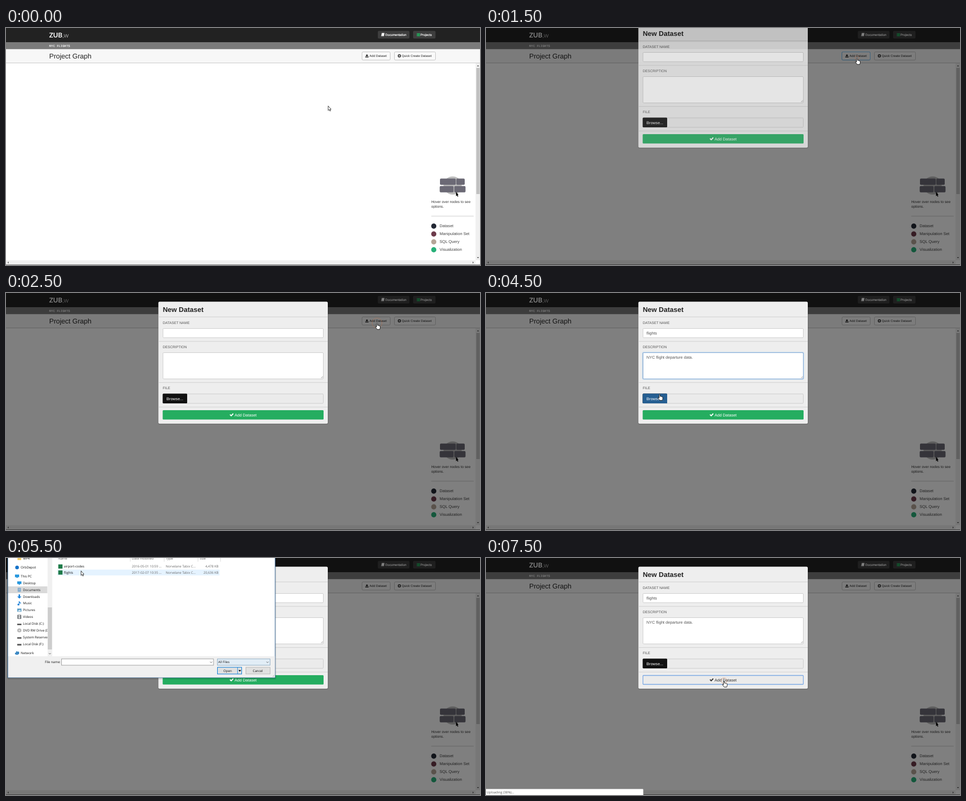
An HTML page for the animation above (8000 ms loop, 900 by 451 pixels).

```html
<!DOCTYPE html>
<html lang="en">
<head>
<meta charset="utf-8">
<title>Add a dataset</title>
<style>
  html, body { margin: 0; width: 100%; height: 100%; overflow: hidden; background: #fff; }
  svg { display: block; width: 900px; height: 451px; }
  text { font-family: "Liberation Sans", Arial, sans-serif; text-rendering: geometricPrecision; white-space: pre; }
  .mono { font: 6px "Liberation Mono", monospace; }
  .btn { font-size: 5.95px; }
  .key { font-size: 7.6px; fill: #444; }
  .label { font-size: 6.7px; fill: #555; }
  .field { font-size: 7.6px; fill: #555; }
  .head { font-size: 13px; }
  .win text, .status text { font-family: "Open Sans", "Noto Sans", sans-serif; font-size: 6.2px; fill: #111; }
  .win .dim { fill: #666; }
  .ring { fill: none; stroke: #cf7040; stroke-width: .8; }
</style>
</head>
<body>
<svg viewBox="0 0 900 451">
  <defs>
    <path id="arrow" d="M0 0V8.6L2 6.8 3.3 9.8 4.6 9.2 3.4 6.4H5.6Z" fill="#fff" stroke="#000" stroke-width=".75"/>
    <path id="hand" d="M-.9.8Q0-.6.9.8V4.2Q2.4 3.7 2.7 4.6 4.1 4.2 4.4 5.1 6 5 6 6.3V9L5 11.8H.3L-3 7.6Q-3.4 6.2-2 6.5L-.9 7.5Z" fill="#fff" stroke="#000" stroke-width=".85"/>
    <path id="check" d="M0 3.4 1.4 2 3 3.6 6.2.2 7.6 1.6 3 6.4Z"/>
    <path id="chevron" d="M-2-1 0 1 2-1" fill="none" stroke="#444" stroke-width=".8"/>
  </defs>

  <g id="page">
    <rect width="900" height="451" fill="#fff"/>
    <rect width="900" height="27" fill="#222"/>
    <rect y="27" width="900" height="13.5" fill="#7b7b7b"/>
    <rect y="40.5" width="900" height="26" fill="#f7f7f7"/>
    <path d="M0 66.5H900" stroke="#c8c8c8"/>
    <text x="82" y="18.2" fill="#fff" style="font:12.5px Lato,sans-serif"><tspan font-weight="700">ZUB</tspan><tspan font-weight="300">,w</tspan></text>
    <text class="mono" x="82" y="36" fill="#fff" stroke="#fff" stroke-width=".15">NYC FLIGHTS</text>
    <text class="head" x="82" y="58" fill="#222">Project Graph</text>

    <g fill="#3e3e3e">
      <rect x="706" y="5.5" width="60" height="14.5" rx="2"/>
      <rect x="773" y="5.5" width="42.5" height="14.5" rx="2"/>
    </g>
    <path d="M713.6 9.6H718.6L717.6 15.6H712.4Z" fill="#fff"/>
    <path d="M713.2 15H717.4" stroke="#888" stroke-width=".5"/>
    <rect x="780" y="10" width="6" height="5.6" fill="#23b35f"/>
    <path d="M780 11.8H786M780 13.7H786M782 10V15.6" stroke="#3e3e3e" stroke-width=".4"/>
    <g class="btn" fill="#fff" stroke="#fff" stroke-width=".18">
      <text x="720.3" y="15">Documentation</text>
      <text x="787" y="15">Projects</text>
    </g>

    <g fill="#f9f9f9" stroke="#c4c4c4">
      <rect x="676" y="45.5" width="53.5" height="15.5" rx="2"/>
      <rect x="737.5" y="45.5" width="78" height="15.5" rx="2"/>
    </g>
    <g class="btn" fill="#222">
      <text x="690.3" y="55.2">Add Dataset</text>
      <text x="751.4" y="55.2">Quick Create Dataset</text>
      <path d="M685.3 50 688 52.8H686.3V54.4H684.3V52.8H682.6ZM682.3 54H683.6V55H687V54H688.3V56H682.3Z"/>
      <circle cx="746.9" cy="53" r="3"/>
      <path d="M745.1 53H748.7M746.9 51.2V54.8" stroke="#fff"/>
    </g>

    <circle cx="848" cy="299.7" r="17.3" fill="#bdbdbd"/>
    <g fill="#6b6975">
      <rect x="824" y="286.5" width="30" height="12" rx="2"/>
      <rect x="855" y="286.5" width="16" height="12" rx="2"/>
      <rect x="823.5" y="300.7" width="26.3" height="12" rx="2"/>
      <rect x="851.2" y="300.7" width="21.3" height="12" rx="2"/>
    </g>
    <path d="M854.5 311.5V320L856.2 318.4 857.4 321 858.7 320.4 857.5 317.8H859.2Z"/>
    <g fill="#333" font-size="6.85">
      <text x="807.4" y="333.2">Hover over nodes to see</text>
      <text x="807.4" y="342.2">options.</text>
    </g>
    <path d="M807.5 358H888" stroke="#ccc"/>
    <g id="legend"></g>

    <rect x="891.5" y="67" width="8.5" height="375" fill="#f0f0f0"/>
    <rect x="893" y="76" width="6.5" height="240" fill="#c1c1c1"/>
    <rect y="442" width="891.5" height="8" fill="#f0f0f0"/>
    <path d="M894.2 73 896.2 70.8 898.2 73ZM894.2 436 896.2 438.2 898.2 436ZM5 444.2 3 446.2 5 448.2ZM886 444.2 888 446.2 886 448.2Z" fill="#555"/>
    <rect y="450" width="900" height="1" fill="#777"/>
  </g>

  <rect data-at="1500 8000" width="900" height="451" opacity=".5"/>
  <rect data-at="1500 2500" x="675.5" y="45.5" width="54" height="15.5" rx="2" fill="none" stroke="#3d6480"/>

  <g id="modal" data-at="1500 8000">
    <rect x="288.7" y="16" width="323" height="234" rx="3" fill="#000" opacity=".22"/>
    <rect x="289.3" y="16.5" width="321.7" height="232.3" rx="2.5" fill="#eee"/>
    <path d="M289.5 45.5H611M289.5 92H611M289.5 170.3H611M289.5 217H611" stroke="#d0d0d0"/>
    <text class="head" x="297.7" y="36.3" font-weight="700" fill="#222">New Dataset</text>
    <g class="label">
      <text x="297.7" y="58.8">DATASET NAME</text>
      <text x="297.7" y="104.9">DESCRIPTION</text>
      <text x="297.7" y="183.4">FILE</text>
    </g>
    <g fill="#fff" stroke="#ccc">
      <rect x="298" y="67.5" width="304.5" height="17.5" rx="1.5"/>
      <rect x="298" y="113.5" width="304.5" height="50" rx="1.5"/>
      <rect x="298" y="192" width="304.5" height="18" rx="1.5" fill="#ebebeb"/>
    </g>
    <path d="M598 162 601.5 158.5M600 162 601.5 160.5" stroke="#777" stroke-width=".6"/>
    <g data-at="3500 5500" fill="none" stroke="#66afe9">
      <rect x="297.5" y="113" width="305.5" height="51" rx="2" stroke-width="2.5" opacity=".25"/>
      <rect x="298" y="113.5" width="304.5" height="50" rx="1.5" stroke="#86a9d6"/>
    </g>
    <g class="field">
      <text data-at="3500 8000" x="304.8" y="78.7">flights</text>
      <text data-at="3500 4500" x="304.8" y="125">NYC flight dep</text>
      <text data-at="4500 8000" x="304.8" y="125">NYC flight departure data.</text>
    </g>
    <rect x="297.5" y="191.5" width="46.5" height="18.5" rx="1.5" fill="#111"/>
    <rect data-at="4500 5500" x="297.5" y="191.5" width="46.5" height="18.5" rx="1.5" fill="#265f92"/>
    <text x="304.8" y="203.5" font-size="7.6" fill="#fff">Browse...</text>
    <g data-at="1500 7500" fill="#fff">
      <rect x="297.5" y="223" width="305.5" height="17.8" rx="1.5" fill="#25ad60"/>
      <use href="#check" x="424.6" y="228.6"/>
      <text x="434" y="234.7" font-size="7.6">Add Dataset</text>
    </g>
    <g data-at="7500 8000" fill="#333">
      <rect x="298" y="223.5" width="304.5" height="17" rx="1" fill="#ebebeb" stroke="#79a7e3" stroke-width="1.3"/>
      <use href="#check" x="424.6" y="228.6"/>
      <text x="434" y="234.7" font-size="7.6">Add Dataset</text>
    </g>
  </g>

  <g class="win" data-at="5500 7500">
    <rect x="2" y="-5" width="511" height="236" rx="3" fill="#000" opacity=".13"/>
    <rect x="3.5" y="-2" width="507.5" height="229.7" fill="#fff" stroke="#3c6d9c"/>
    <rect x="4" y="187" width="506.5" height="40.3" fill="#f0f0f0"/>
    <rect x="79" y="0" width="8.7" height="187" fill="#f0f0f0"/>
    <rect x="79.3" y="94" width="8" height="80" fill="#cdcdcd"/>
    <use href="#chevron" x="83.3" y="182"/>
    <rect x="4" y="54" width="74.5" height="13" fill="#d9d9d9"/>
    <clipPath id="side"><rect x="4" y="0" width="74.7" height="187"/></clipPath>
    <g id="tree" clip-path="url(#side)"></g>
    <path d="M236 0V7M300.3 0V7M364.6 0V7M407.3 0V7" stroke="#ddd"/>
    <rect data-at="5500 6500" x="97.5" y="22" width="308" height="11.2" fill="#e5f3ff"/>
    <rect data-at="6500 7500" x="97.5" y="22" width="308" height="11.2" fill="#d9d9d9"/>
    <g id="files"></g>

    <text x="74" y="200.3">File name:</text>
    <rect x="105.5" y="192" width="288.5" height="12" fill="#fff" stroke="#8a8a8a" stroke-width=".8"/>
    <use href="#chevron" x="389.5" y="198.3"/>
    <g data-at="6500 7500">
      <rect x="107" y="193.8" width="19.3" height="8.6" fill="#0078d7"/>
      <text x="107.2" y="200.3" style="fill:#fff">flights</text>
    </g>
    <rect x="401.3" y="192" width="100" height="12" fill="#e2edf6" stroke="#7b9db8" stroke-width=".8"/>
    <text x="403" y="200.3">All Files</text>
    <use href="#chevron" x="496.5" y="198.3"/>
    <rect x="401.5" y="208" width="46" height="12.8" fill="#e1e1e1" stroke="#0078d7"/>
    <rect data-at="6500 7500" x="402" y="208.5" width="45" height="11.8" fill="#d3e8f8"/>
    <path d="M439.7 208V220.8" stroke="#0078d7" stroke-width=".8"/>
    <path d="M441.4 213.2H446.4L443.9 216.2Z"/>
    <text x="412.8" y="216.5">Open</text>
    <rect x="455.4" y="208" width="46" height="12.8" fill="#e1e1e1" stroke="#adadad" stroke-width=".8"/>
    <text x="468.5" y="216.5">Cancel</text>
    <path d="M506 226 509.5 222.5M508 226 509.5 224.5" stroke="#aaa" stroke-width=".7"/>
  </g>

  <g class="status" data-at="7500 8000">
    <path d="M-1 439.5H297Q298.7 439.5 298.7 441V452H-1Z" fill="#fff" stroke="#b5b5b5"/>
    <text x="1.3" y="447.6" style="fill:#555">Uploading (38%)...</text>
  </g>

  <circle class="ring" id="ring"/>
  <path id="beam" d="M-1.8 0H1.8M0 0V8M-1.8 8H1.8" fill="none" stroke="#222" stroke-width=".8"/>
  <use id="arrowPtr" href="#arrow"/>
  <use id="handPtr" href="#hand"/>
</svg>

<script>
const $ = id => document.getElementById(id);
const NS = 'http://www.w3.org/2000/svg';

function add(parent, tag, attrs, text = '') {
  const el = document.createElementNS(NS, tag);
  for (const k in attrs) el.setAttribute(k, attrs[k]);
  el.textContent = text;
  parent.append(el);
}

[['Dataset', '#232834'], ['Manipulation Set', '#6d3b4b'], ['SQL Query', '#b6a598'], ['Visualization', '#28b078']]
  .forEach(([name, fill], i) => {
    const y = 377 + i * 15;
    add($('legend'), 'circle', { cx: 812.2, cy: y, r: 4.9, fill });
    add($('legend'), 'text', { class: 'key', x: 823.3, y: y + 2.4 }, name);
  });

// Icon outlines are drawn around their own centre.
const icons = {
  folder: ['M-3.5-3H-.5L.3-2H3.5V3H-3.5Z', '#f3cf6b'],
  cloud: ['M-3.5 0A3.5 3.5 0 1 1 3.5 0A3.5 3.5 0 1 1-3.5 0Z', '#1673c9'],
  screen: ['M-4-3H4V2H1V3.5H-1V2H-4Z', '#2496dd'],
  page: ['M-3-3.8H3V3.8H-3ZM-1.5-2V-1.2H1.5V-2ZM-1.5 0V.8H1.5V0Z', '#7fa9cc'],
  down: ['M-1.4-4H1.4V0H4L0 4-4 0H-1.4Z', '#1e82d8'],
  note: ['M-1-4 .2-4Q.5-2 3-1V1Q1.5-.6 .2-.7V2.2A1.9 1.6 0 1 1-1 1Z', '#1e82d8'],
  photo: ['M-4-3H4V3H-4ZM-3 2H3L1-1-.5 1-1.5 0Z', '#5b9fc8'],
  film: ['M-3.5-3.8H3.5V3.8H-3.5ZM-2-2.8V-.5H2V-2.8ZM-2 .5V2.8H2V.5Z', '#4b5257'],
  disk: ['M-4 0H4V2.8H-4Z', '#555'],
  disc: ['M-4 0A4 3.8 0 1 1 4 0A4 3.8 0 1 1-4 0ZM-1 0A1 1 0 1 0 1 0A1 1 0 1 0-1 0Z', '#b9b9b9'],
  net: ['M-2-3.5 4-2.5V1.5L0 3.5-4 2V-.5L-2-1Z', '#3e8ac4']
};
[['folder', 'MP4', 1], ['cloud', 'OrbDepot', 18, 1], ['screen', 'This PC', 34.5, 1],
 ['screen', 'Desktop', 47.5], ['page', 'Documents', 60.5], ['down', 'Downloads', 73.3],
 ['note', 'Music', 86.2], ['photo', 'Pictures', 99.2], ['film', 'Videos', 112],
 ['disk', 'Local Disk (C:)', 125], ['disc', 'DVD RW Drive (D', 137.8], ['disk', 'System Reserved', 150.7],
 ['disk', 'Local Disk (F:)', 163.6], ['net', 'Network', 181, 1]]
  .forEach(([icon, name, y, root]) => {
    const [d, fill] = icons[icon], x = root ? 28 : 32.3;
    add($('tree'), 'path', { d, fill, 'fill-rule': 'evenodd', transform: `translate(${x - 7} ${y})` });
    add($('tree'), 'text', { x, y: y + 2.2 }, name);
  });

const cols = [110, 239, 303.3];
function row(y, cells, size) {
  add($('files'), 'rect', { x: 99.3, y: y - 4, width: 8, height: 8, fill: '#1d7a48' });
  cells.forEach((c, i) => add($('files'), 'text', { x: cols[i], y: y + 2.2, class: i ? 'dim' : '' }, c));
  add($('files'), 'text', { x: 403.5, y: y + 2.2, class: 'dim', 'text-anchor': 'end' }, size);
}
[['Name', 99], ['Date modified', 239], ['Type', 303.3], ['Size', 368]]
  .forEach(([name, x]) => add($('files'), 'text', { x, y: 3.3, class: 'dim' }, name));
row(16.2, ['airport-codes', '2016-05-01 10:59 ...', 'Norvelane Tabix C...'], '4,478 KB');
row(27.6, ['flights', '2017-02-07 10:35 ...', 'Norvelane Tabix C...'], '20,636 KB');

// start, pointer, x, y, then click ring: x, y, radius, opacity
const steps = [
  [0, 'arrowPtr', 611.7, 148.3],
  [500, 'handPtr', 704.5, 57.5],
  [1500, 'handPtr', 704.5, 57.5, 704.5, 57, 4, .45],
  [2500, 'handPtr', 704.5, 57.5, 704.5, 57, 9.5, .5],
  [3500, 'beam', 420, 79.5],
  [4500, 'handPtr', 329.7, 192.5],
  [5500, 'arrowPtr', 142.5, 24.5],
  [6500, 'arrowPtr', 429.8, 208.3, 143.3, 24.5, 9.5, .9],
  [7500, 'handPtr', 452, 233.8, 452, 233.5, 5.5, .6]
];
const timed = [...document.querySelectorAll('[data-at]')]
  .map(el => [el, ...el.dataset.at.split(' ').map(Number)]);
const show = (el, on) => { el.style.display = on ? '' : 'none'; };

function draw(now) {
  const t = now % 8000;
  for (const [el, from, to] of timed) show(el, t >= from && t < to);

  const [, ptr, x, y, rx = 0, ry = 0, r = 0, alpha = 0] = steps.findLast(s => s[0] <= t);
  for (const id of ['arrowPtr', 'handPtr', 'beam']) show($(id), id === ptr);
  $(ptr).setAttribute('transform', `translate(${x} ${y})`);
  const ring = $('ring');
  ring.setAttribute('transform', `translate(${rx} ${ry})`);
  ring.setAttribute('r', r);
  ring.setAttribute('opacity', alpha);

  const entering = t < 2500;
  $('modal').setAttribute('transform', `translate(0 ${entering ? -21 : 0})`);
  $('modal').setAttribute('opacity', entering ? .8 : 1);
}

const start = performance.now();
function tick() {
  draw(performance.now() - start);
  requestAnimationFrame(tick);
}
tick();
</script>
</body>
</html>
```
